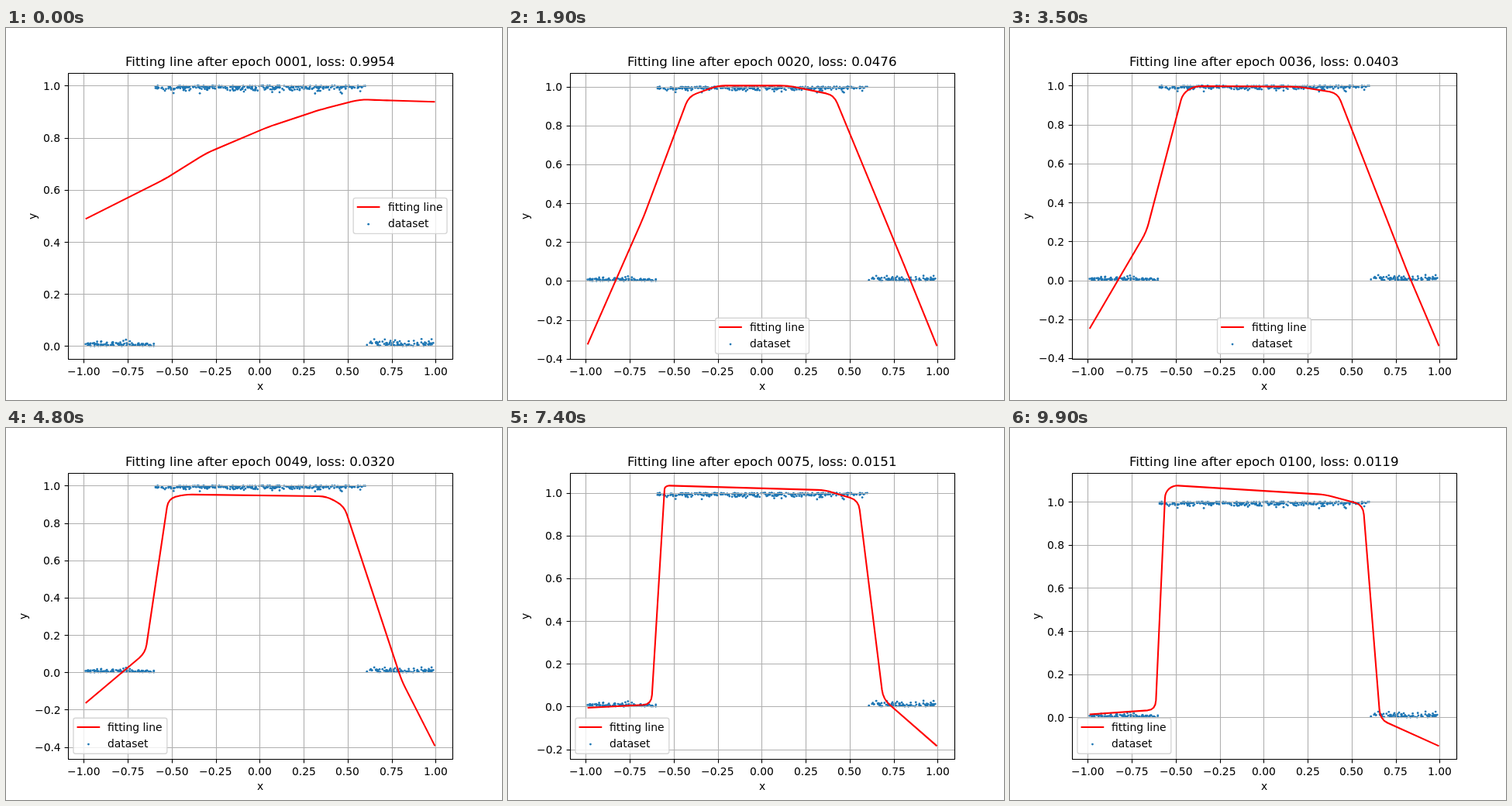
An HTML page with a canvas that plays this animation: 640 px wide and 480 px high, repeating every 10 s.

```html
<!DOCTYPE html>
<html lang="en">
<head>
<meta charset="utf-8">
<title>Fitting line</title>
<style>
  html, body { margin: 0; width: 100%; height: 100%; overflow: hidden; background: #fff; }
  canvas { display: block; width: 640px; height: 480px; }
</style>
</head>
<body>
<canvas id="plot" width="640" height="480"></canvas>
<script>
const ctx = document.getElementById('plot').getContext('2d');
const FRAME_MS = 100, EPOCHS = 100;
const PT = 100 / 72, THIN = 0.8 * PT, THICK = 1.5 * PT;
const BOX = { left: 80, right: 576, top: 57.6, bottom: 427.2 };
const BLUE = '#1f77b4', RED = '#ff0000', GRID = '#b0b0b0';
const FONT = '"DejaVu Sans", Verdana, sans-serif';
const X_MIN = -0.99, X_MAX = 0.996;
const snap = v => Math.floor(v + 0.5) + 0.5;
const mix = (a, b, k) => a + (b - a) * k;
const mixPoint = (p, q, k) => [mix(p[0], q[0], k), mix(p[1], q[1], k)];
const px = x => 327.4 + 227 * x;

// Key poses: left height, six corners from left to right, right height.
const poses = [];
function pose(epoch, loss, left, corners, right) {
  poses.push({ epoch, loss, points: [[X_MIN, left], ...corners, [X_MAX, right]] });
}
pose(1, .9954, .488, [[-.54, .641], [-.3, .742], [.05, .842], [.34, .907], [.57, .947], [.7, .944]], .938);
pose(20, .0476, -.327, [[-.67, .333], [-.415, .95], [-.25, 1.005], [.15, 1.005], [.41, .957], [.8, .102]], -.335);
pose(36, .0403, -.249, [[-.667, .25], [-.46, .962], [-.39, .998], [.2, .994], [.42, .962], [.82, .035]], -.338);
pose(49, .032, -.165, [[-.65, .105], [-.52, .93], [-.43, .953], [.38, .943], [.48, .89], [.807, -.045]], -.395);
pose(63, .0209, -.008, [[-.64, .006], [-.545, .995], [-.52, 1.012], [.38, .997], [.525, .933], [.725, .055]], -.283);
pose(75, .0151, -.006, [[-.627, .01], [-.552, 1.025], [-.535, 1.034], [.36, 1.013], [.55, .965], [.69, .035]], -.185);
pose(100, .0119, .014, [[-.615, .035], [-.56, 1.045], [-.515, 1.076], [.35, 1.033], [.565, .985], [.662, -.01]], -.133);

function stateAt(epoch) {
  const next = Math.max(1, poses.findIndex(p => p.epoch >= epoch));
  const a = poses[next - 1], b = poses[next];
  let k = (epoch - a.epoch) / (b.epoch - a.epoch);
  if (next === 1) k **= 0.35; // training starts fast
  return {
    loss: a.loss * (b.loss / a.loss) ** k,
    curve: rounded(a.points.map((p, i) => mixPoint(p, b.points[i], k)))
  };
}

// Replaces each inner corner by a short quadratic arc.
function rounded(points) {
  const length = (p, q) => Math.hypot(q[0] - p[0], q[1] - p[1]);
  const out = [points[0]];
  for (let i = 1; i < points.length - 1; i++) {
    const [p, c, q] = points.slice(i - 1, i + 2);
    const before = length(c, p), after = length(c, q);
    const cut = Math.min(0.045, before / 2, after / 2);
    const start = mixPoint(c, p, cut / before), end = mixPoint(c, q, cut / after);
    for (let k = 0; k <= 1; k += 0.25) {
      out.push(mixPoint(mixPoint(start, c, k), mixPoint(c, end, k), k));
    }
  }
  out.push(points[points.length - 1]);
  return out;
}

// Noisy box function: 1 in the middle, 0 on both sides.
let seed = 20;
const rand = () => (seed = (seed * 16807) % 2147483647) / 2147483647;
const normal = () => Math.sqrt(-2 * Math.log(rand())) * Math.cos(2 * Math.PI * rand());
const dots = Array.from({ length: 500 }, () => {
  const x = mix(X_MIN, X_MAX, rand());
  const off = Math.min(0.03, Math.abs(0.01 * normal()));
  return [x, Math.abs(x) < 0.6 ? 1 - off : off];
});

// Text starts on a whole pixel; anchor 0 is left, 0.5 centre, 1 right.
function text(str, x, y, anchor = 0.5, size = 10) {
  ctx.font = `${size * PT}px ${FONT}`;
  ctx.fillStyle = '#000';
  ctx.fillText(str, Math.round(x - anchor * ctx.measureText(str).width), Math.round(y));
}

function stroke(points, color, width) {
  ctx.beginPath();
  points.forEach(([x, y]) => ctx.lineTo(x, y));
  ctx.strokeStyle = color;
  ctx.lineWidth = width;
  ctx.stroke();
}

function dot([x, y]) {
  ctx.beginPath();
  ctx.arc(x, y, 1.4, 0, 2 * Math.PI);
  ctx.fillStyle = BLUE;
  ctx.fill();
}

// First spot in order that covers neither the curve nor the dots.
const LEGEND = { w: 120.9, h: 46 };
const L = BOX.left + 6.94, R = BOX.right - 6.94 - LEGEND.w, C = (L + R) / 2;
const LOW = BOX.bottom - 6.94 - LEGEND.h, MID = (BOX.top + BOX.bottom - LEGEND.h) / 2;
const SPOTS = [[L, LOW], [R, LOW], [R, MID], [L, MID], [C, LOW]];
function legendSpot(line, marks) {
  const covered = marks.slice();
  for (let i = 1; i < line.length; i++) {
    for (let k = 0; k <= 1; k += 0.05) covered.push(mixPoint(line[i - 1], line[i], k));
  }
  const free = ([x, y]) => !covered.some(p =>
    p[0] > x && p[0] < x + LEGEND.w && p[1] > y && p[1] < y + LEGEND.h);
  return SPOTS.find(free) || [C, LOW];
}

function drawLegend([x, y]) {
  ctx.beginPath();
  ctx.roundRect(x, y, LEGEND.w, LEGEND.h, 2.78);
  ctx.fillStyle = 'rgba(255,255,255,.8)';
  ctx.fill();
  ctx.strokeStyle = 'rgba(204,204,204,.8)';
  ctx.lineWidth = PT;
  ctx.stroke();
  const lineY = Math.round(y + 11.8);
  stroke([[x + 4.6, lineY], [x + 34.3, lineY]], RED, THICK);
  dot([x + 19.5, y + 33.8]);
  text('fitting line', x + 44.45, y + 16.8, 0);
  text('dataset', x + 44.45, y + 37.8, 0);
}

function draw(epoch) {
  const { curve, loss } = stateAt(epoch);
  const heights = curve.map(p => p[1]);
  const low = Math.min(0, ...heights), high = Math.max(1, ...heights);
  const pad = (BOX.bottom - BOX.top) / 22;
  const unit = (BOX.bottom - BOX.top - 2 * pad) / (high - low);
  const py = y => BOX.top + pad + (high - y) * unit;
  const place = ([x, y]) => [px(x), py(y)];
  const line = curve.map(place), marks = dots.map(place);
  const label = (v, digits) => v.toFixed(digits).replace('-', '\u2212');

  const xTicks = [], yTicks = [];
  for (let i = -4; i <= 4; i++) xTicks.push(i / 4);
  for (let i = -5; i <= 6; i++) {
    const y = py(i / 5);
    if (y >= BOX.top && y <= BOX.bottom) yTicks.push(i / 5);
  }

  ctx.fillStyle = '#fff';
  ctx.fillRect(0, 0, 640, 480);
  ctx.lineJoin = 'round';
  marks.forEach(dot);

  for (const v of xTicks) {
    const x = snap(px(v));
    stroke([[x, BOX.top], [x, BOX.bottom]], GRID, THIN);
    stroke([[x, 427.5], [x, 432.4]], '#000', THIN);
    text(label(v, 2), px(v), 448);
  }
  for (const v of yTicks) {
    const y = snap(py(v));
    stroke([[BOX.left, y], [BOX.right, y]], GRID, THIN);
    stroke([[75.6, y], [80.5, y]], '#000', THIN);
    text(label(v, 1), 70.3, py(v) + 5.5, 1);
  }

  stroke(line, RED, THICK);
  ctx.strokeStyle = '#000';
  ctx.lineWidth = THIN;
  ctx.strokeRect(80.5, 58.5, 496, 369);

  text('x', 328, 467);
  ctx.save();
  ctx.translate(yTicks[0] < 0 ? 27 : 39, 243);
  ctx.rotate(-Math.PI / 2);
  text('y', 0, 0);
  ctx.restore();

  const count = String(epoch).padStart(4, '0');
  text(`Fitting line after epoch ${count}, loss: ${loss.toFixed(4)}`, 328, 49, 0.5, 12);
  drawLegend(legendSpot(line, marks));
}

let shown = 0;
function tick() {
  const epoch = Math.floor(performance.now() / FRAME_MS) % EPOCHS + 1;
  if (epoch !== shown) draw(shown = epoch);
  requestAnimationFrame(tick);
}
tick();
</script>
</body>
</html>
```
